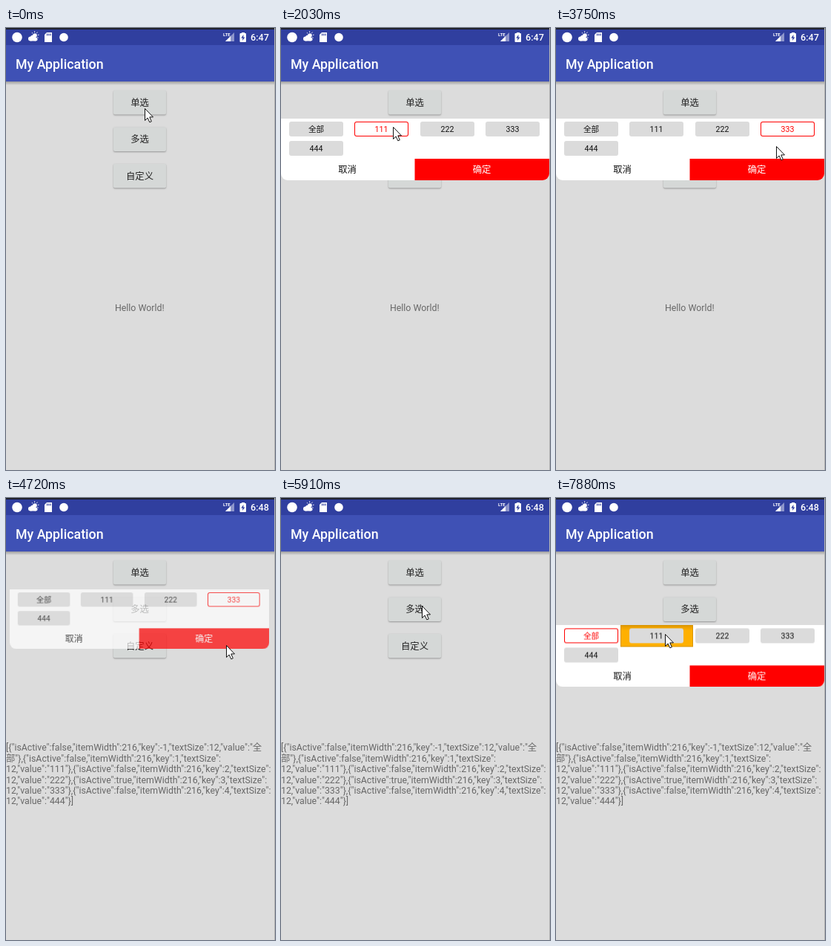
These frames come from a looping animation (363x595 px, 8 s). An HTML page with a canvas:

```html
<!DOCTYPE html>
<html lang="zh-CN">
<head>
<meta charset="utf-8">
<title>My Application</title>
<style>
html, body { margin: 0; width: 100%; height: 100%; overflow: hidden; background: #dcdcdc; }
canvas { display: block; width: 363px; height: 595px; }
</style>
</head>
<body>
<canvas id="stage" width="363" height="595"></canvas>
<script>
const LOOP = 8000, STEP = 130;
const W = 362, POPUP_H = 83, ROW = 49.4;
const FONT = 'Roboto, "Noto Sans CJK SC", "Noto Sans CJK", sans-serif';
const CHIPS = ['全部', '111', '222', '333', '444'];
const BUTTONS = ['单选', '多选', '自定义'];

// The pointer glides to each stop in a few visible steps.
const HOME = { x: 187, y: 108 };
const MOVES = [
  { start: 1320, steps: 3, x: 151, y: 133 },
  { start: 2490, steps: 4, x: 301, y: 131 },
  { start: 3750, steps: 1, x: 297, y: 159 },
  { start: 3880, steps: 4, x: 297, y: 198 },
  { start: 5520, steps: 4, x: 190, y: 145 },
  { start: 7190, steps: 4, x: 147, y: 183 }
];

const SHOWS = [
  { open: 500, close: 4720, row: 0, taps: [{ time: 2030, chip: 1 }, { time: 3190, chip: 3 }] },
  { open: 6770, close: LOOP, row: 1, taps: [] }
];
const OPENING = { scale: 0.978, alpha: 0.74 };
const CLOSING = { scale: 0.967, alpha: 0.7 };
const SETTLED = { scale: 1, alpha: 1 };

const stage = document.getElementById('stage').getContext('2d');
const layer = document.createElement('canvas');
layer.width = W;
layer.height = POPUP_H;
const sheet = layer.getContext('2d');

const item = (key, value, active) =>
  `{"isActive":${active},"itemWidth":216,"key":${key},"textSize":12,"value":"${value}"}`;
const json = '[' + CHIPS.map((c, i) => item(i || -1, c, i === 3)).join(',') + ']';
// Lines break after the first CJK character and after each later "textSize":
const RESULT = json.replace('全', '全\n').replace(/"textSize":(?=12,"value":"\d)/g, '$&\n').split('\n');

const easeOut = p => 1 - (1 - p) ** 2.4;

function pointerAt(t) {
  let { x, y } = HOME;
  for (const m of MOVES) {
    if (t < m.start) break;
    const done = Math.min(m.steps, Math.floor((t - m.start) / STEP) + 1);
    const k = easeOut(done / m.steps);
    x += (m.x - x) * k;
    y += (m.y - y) * k;
  }
  return { x: Math.round(x), y: Math.round(y) };
}

function text(c, str, x, y, size, color, align = 'left', weight = 400) {
  c.font = `${weight} ${size}px ${FONT}`;
  c.textAlign = align;
  c.fillStyle = color;
  c.fillText(str, x, y);
}

function rect(c, x, y, w, h, color) {
  c.fillStyle = color;
  c.fillRect(x, y, w, h);
}

function round(c, x, y, w, h, r, color) {
  c.beginPath();
  c.roundRect(x, y, w, h, r);
  c.fillStyle = color;
  c.fill();
}

function poly(c, points, color) {
  c.beginPath();
  points.forEach(([x, y]) => c.lineTo(x, y));
  c.closePath();
  c.fillStyle = color;
  c.fill();
}

function disc(c, x, y, r) {
  c.beginPath();
  c.arc(x, y, r, 0, Math.PI * 2);
  c.fillStyle = '#fff';
  c.fill();
}

function fade(c, y0, y1, from, to) {
  const g = c.createLinearGradient(0, y0, 0, y1);
  g.addColorStop(0, from);
  g.addColorStop(1, to);
  return g;
}

function drawWeather(c) {
  disc(c, 39, 10, 2.8);
  c.strokeStyle = '#fff';
  c.lineWidth = 1;
  for (let i = 0; i < 5; i++) {
    const a = -2.4 + i * 0.75, dx = Math.cos(a), dy = Math.sin(a);
    c.beginPath();
    c.moveTo(39 + 4 * dx, 10 + 4 * dy);
    c.lineTo(39 + 5.6 * dx, 10 + 5.6 * dy);
    c.stroke();
  }
  disc(c, 33, 14.5, 3);
  disc(c, 36.5, 13, 3.6);
  disc(c, 40, 15, 2.5);
  rect(c, 33, 14.5, 7, 3, '#fff');
}

function drawStatus(c, t) {
  rect(c, 0, 0, W, 23, '#303f9f');
  rect(c, 0, 0, W, 2, '#20222e');
  disc(c, 15, 12.5, 6.8);
  drawWeather(c);
  poly(c, [[55, 6], [62, 6], [62, 19], [52, 19], [52, 9]], '#fff');
  for (let i = 0; i < 3; i++) rect(c, 55 + i * 2.2, 7.5, 1.1, 2.8, '#303f9f');
  disc(c, 78, 12.5, 5.8);

  poly(c, [[308, 6], [308, 18], [296, 18]], '#8d95cb');
  poly(c, [[303, 11], [303, 18], [296, 18]], '#fff');
  text(c, 'LTE', 293, 11, 6, '#fff', 'left', 700);

  rect(c, 318, 6, 4, 2, '#fff');
  round(c, 315.5, 7, 8.5, 12, 1, '#fff');
  poly(c, [[320.5, 9], [317.2, 13.6], [319.4, 13.6], [319.1, 17], [322.4, 12.4], [320.3, 12.4]], '#303f9f');
  text(c, t < 4290 ? '6:47' : '6:48', 330, 17, 12.6, '#fff', 'left', 500);
}

function drawButton(c, label, i) {
  const y = 84 + i * ROW;
  c.save();
  c.shadowColor = 'rgba(0,0,0,.32)';
  c.shadowBlur = 2;
  c.shadowOffsetY = 1;
  round(c, 145, y, 71, 32.5, 2, '#d5d8d7');
  c.restore();
  text(c, label, 180.5, Math.round(y + 21), 12.35, '#222', 'center');
}

function drawScreen(c, t) {
  rect(c, 0, 0, 363, 595, '#dcdcdc');
  rect(c, 0, 23, W, 49, '#3f51b5');
  rect(c, 0, 72, W, 5, fade(c, 72, 77, 'rgba(0,0,0,.28)', 'rgba(0,0,0,0)'));
  drawStatus(c, t);
  text(c, 'My Application', 13, 54.5, 17.8, '#fff', 'left', 500);
  BUTTONS.forEach((label, i) => drawButton(c, label, i));
  if (t < 4720) text(c, 'Hello World!', 180.3, 381, 12.35, '#686868', 'center');
  else RESULT.forEach((line, i) => text(c, line, 0, 340.3 + i * 14.4, 12.33, '#686868'));
  rect(c, 362, 0, 1, 595, '#b4b4b4');
}

function drawChip(c, label, i, selected) {
  const x = Math.round(11 + (i % 4) * 88.4);
  const y = i < 4 ? 4 : 30;
  round(c, x, y, 73, 20, 3, selected ? '#f00' : '#dbdbdb');
  if (selected) round(c, x + 1, y + 1, 71, 18, 2, '#fff');
  text(c, label, x + 36.5, y + 14, 10.6, selected ? '#f00' : '#111', 'center');
}

function drawSheet(c, choice, pressed) {
  c.clearRect(0, 0, W, POPUP_H);
  c.save();
  round(c, 0, 0, W, POPUP_H, [0, 0, 9, 9], '#fff');
  c.clip();
  rect(c, 180.5, 54, 182, 29, '#f00');
  if (pressed) {
    rect(c, 87, 0, 98, 29, '#d99400');
    rect(c, 88, 1, 96, 27, fade(c, 1, 7, '#e79d00', '#ffb000'));
  }
  CHIPS.forEach((label, i) => drawChip(c, label, i, i === choice));
  text(c, '取消', 89.5, 73, 12.35, '#111', 'center');
  text(c, '确定', 271, 73, 12.35, '#fff', 'center');
  c.restore();
}

function drawPopup(c, t) {
  const show = SHOWS.find(s => t >= s.open && t < s.close + STEP);
  if (!show) return;
  const { scale, alpha } = t < show.open + STEP ? OPENING : t >= show.close ? CLOSING : SETTLED;
  const tap = show.taps.filter(p => p.time <= t).pop();
  drawSheet(sheet, tap ? tap.chip : 0, t >= 7880);

  const shrink = 1 - scale;
  c.save();
  c.globalAlpha = alpha;
  c.translate(155 * shrink, 122 + show.row * ROW + 35 * shrink);
  c.scale(scale, scale);
  c.drawImage(layer, 0, 0);
  c.restore();
}

function drawPointer(c, t) {
  const { x, y } = pointerAt(t);
  c.save();
  c.translate(x + 0.5, y + 0.5);
  poly(c, [[0, 0], [0, 16], [3.6, 12.5], [6.3, 18.3], [8.8, 17.3], [6.3, 11.4], [11, 11.4]], '#fff');
  c.strokeStyle = '#111';
  c.lineWidth = 1;
  c.stroke();
  c.restore();
}

const start = performance.now();
function frame() {
  const t = (performance.now() - start) % LOOP;
  drawScreen(stage, t);
  drawPopup(stage, t);
  drawPointer(stage, t);
  requestAnimationFrame(frame);
}
frame();
</script>
</body>
</html>
```
